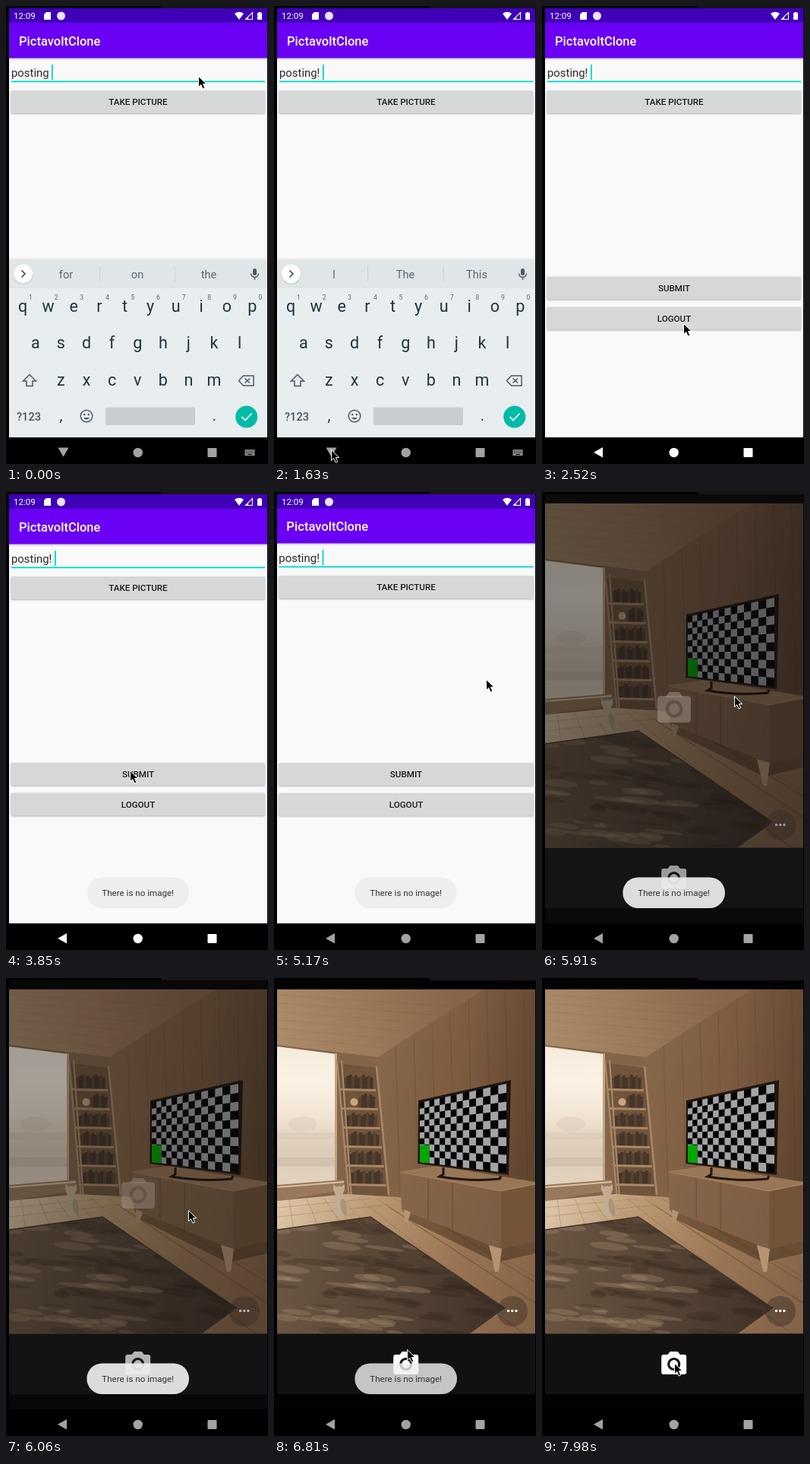
Animation of 345x602 px, one loop 8000 ms. Source, as an HTML page with a canvas:

```html
<!DOCTYPE html>
<html lang="en">
<head>
<meta charset="utf-8">
<title>Posting a photo</title>
<style>
  html, body { margin: 0; width: 100%; height: 100%; overflow: hidden; background: #000; }
  canvas { display: block; }
</style>
</head>
<body>
<canvas id="stage" width="345" height="602"></canvas>
<script>
const ctx = document.getElementById('stage').getContext('2d');
const LOOP = 8000, STEP = 147.9;
const TEAL = '#00d9c5', KEY = '#20343b', SOFT = '#5a6a72';

// Times in ms
const TYPED = 147, SPACED = 440, CLOSE_KEYS = 1700, SUBMIT = 3300, TOAST_IN = 3600,
      PICTURE = 4560, LEAVE = 4860, CAMERA = 5460, PREVIEW = 5750, BRIGHTEN = 5920, TOAST_OUT = 6600;

const POINTER = [
  [0, 253, 92], [300, 253, 92], [740, 296, 260], [1340, 180, 558], [1630, 75, 583],
  [1930, 75, 583], [2514, 186, 417], [2670, 186, 415], [3250, 164, 366], [3860, 163, 366],
  [4440, 268, 126], [4740, 268, 126], [5170, 279, 246], [5330, 279, 246], [5910, 253, 268],
  [6500, 175, 488], [7100, 175, 488], [7540, 174, 506], [8000, 174, 506]
];

const clamp = v => Math.max(0, Math.min(1, v));
const mix = (a, b, k) => a + (b - a) * k;
const ramp = (t, from, to) => clamp((t - from) / (to - from));
const ease = k => k * k * (3 - 2 * k);
const noise = n => { const v = Math.sin(n * 127.1) * 43758.5; return v - Math.floor(v); };

function rect(x, y, w, h, color) {
  ctx.fillStyle = color;
  ctx.fillRect(x, y, w, h);
}
function shape(path, fill, stroke, width = 1) {
  const p = new Path2D(path);
  if (fill) { ctx.fillStyle = fill; ctx.fill(p); }
  if (stroke) { ctx.strokeStyle = stroke; ctx.lineWidth = width; ctx.stroke(p); }
}
function circle(x, y, r, fill, stroke, width = 1) {
  ctx.beginPath();
  ctx.arc(x, y, r, 0, 7);
  if (fill) { ctx.fillStyle = fill; ctx.fill(); }
  if (stroke) { ctx.strokeStyle = stroke; ctx.lineWidth = width; ctx.stroke(); }
}
function ellipse(x, y, rx, ry, tilt, fill) {
  ctx.beginPath();
  ctx.ellipse(x, y, rx, ry, tilt, 0, 7);
  ctx.fillStyle = fill;
  ctx.fill();
}
function rounded(x, y, w, h, r, fill) {
  ctx.beginPath();
  ctx.roundRect(x, y, w, h, r);
  ctx.fillStyle = fill;
  ctx.fill();
}
function text(value, x, y, size, color, weight = 400, align = 'center') {
  ctx.font = `${weight} ${size}px Roboto, sans-serif`;
  ctx.textAlign = align;
  ctx.fillStyle = color;
  ctx.fillText(value, x, y);
}
function fade(x0, y0, x1, y1, ...colors) {
  const g = ctx.createLinearGradient(x0, y0, x1, y1);
  colors.forEach((c, i) => g.addColorStop(i / (colors.length - 1), c));
  return g;
}
function within(path, draw) {
  ctx.save();
  ctx.clip(new Path2D(path));
  draw();
  ctx.restore();
}
function at(x, y, scale, draw) {
  ctx.save();
  ctx.translate(x, y);
  ctx.scale(scale, scale);
  draw();
  ctx.restore();
}

function statusBar() {
  rect(4, 3, 340, 19.5, '#3f00b8');
  text('12:09', 10, 17, 11.6, '#fff', 400, 'left');
  shape('M53 8H59V18H50V11Z', '#fff');
  circle(72.5, 13, 5.5, '#e9e0fa');
  shape('M301 10Q307 5.5 313 10L307 18Z', '#fff');
  shape('M324.5 8.5V17.5H315.5Z', null, '#fff', 1.1);
  shape('M319 14.5V17.5H316Z', '#fff');
  shape('M331 9H332.5V8H335.5V9H337V18H331Z', '#fff');
}

function button(label, y, t, press, x) {
  ctx.save();
  ctx.shadowColor = 'rgba(0,0,0,.28)';
  ctx.shadowBlur = 2;
  ctx.shadowOffsetY = 1;
  rounded(6.5, y, 334.5, 30, 2, '#d6d7d7');
  ctx.restore();
  const age = t - press;
  if (age >= 0 && age < 450) within(`M6.5 ${y}h334.5v30h-334.5Z`, () =>
    circle(x, y + 15, mix(20, 340, ramp(age, 0, 250)), `rgba(0,0,0,${.12 * (1 - ramp(age, 150, 450))})`));
  text(label, 174, y + 19.2, 11.6, '#1c1c1c', 500);
}

function field(t) {
  const value = t < TYPED ? 'posting ' : t < SPACED ? 'posting!' : 'posting! ';
  text(value, 7, 93, 14.9, '#2a2a2a', 400, 'left');
  const caretX = 7 + ctx.measureText(value).width;
  const shown = t < SPACED || t > LEAVE || (t - SPACED) % 1000 < 500;
  if (shown) rect(Math.round(caretX), 77, 1.8, 20, TEAL);
  rect(7, 98.4, 334, 1.8, TEAL);
}

function app(t) {
  statusBar();
  within('M4 22H344V567H4Z', () => {
    const zoom = mix(1, 1.004, ramp(t, LEAVE, 5170));
    ctx.translate(174, 330);
    ctx.scale(zoom, zoom);
    ctx.translate(-174, -330);
    rect(0, 68, 345, 500, '#f9f9f9');
    rect(0, 68, 345, 4, fade(0, 68, 0, 72, 'rgba(0,0,0,.2)', 'rgba(0,0,0,0)'));
    rect(0, 20, 345, 48.5, '#6a00f4');
    text('PictavoltClone', 17, 52, 16.5, '#fff', 500, 'left');
    field(t);
    button('TAKE PICTURE', 111, t, PICTURE, 268);
    button('SUBMIT', 355.8, t, SUBMIT, 164);
    button('LOGOUT', 395.4, t, Infinity, 0);
    const slide = 236 * ease(ramp(t, CLOSE_KEYS, CLOSE_KEYS + 320));
    if (slide < 236) {
      ctx.translate(0, slide);
      keyboard(t);
    }
  });
}

function keyboard(t) {
  rect(4, 330, 340, 4, fade(0, 330, 0, 334, 'rgba(0,0,0,0)', 'rgba(0,0,0,.08)'));
  rect(4, 334, 340, 37, '#e0e5e8');
  rect(4, 371, 340, 197, '#e8edf0');

  circle(22.5, 353, 13, 'rgba(0,0,0,.1)');
  circle(22.5, 352, 12.5, '#fff');
  shape('M20.5 347.5L25 352L20.5 356.5', null, '#444f55', 1.7);
  const words = t < TYPED ? ['for', 'on', 'the'] : ['I', 'The', 'This'];
  words.forEach((w, i) => text(w, 79 + 94 * i, 357.5, 14.6, SOFT));
  rect(123, 342, 1, 20, '#cbd1d4');
  rect(222.5, 342, 1, 20, '#cbd1d4');
  rounded(325, 345, 5, 9, 2.5, '#4a5a62');
  shape('M322.5 351.5Q323 356.5 327.5 356.5T332.5 351.5M327.5 356.5V360', null, '#4a5a62', 1.4);

  [...'qwertyuiop'].forEach((c, i) => {
    text(c, 22 + 33.6 * i, 401.5, 21.5, KEY);
    text((i + 1) % 10, 32.5 + 33.6 * i, 385.5, 8.6, SOFT);
  });
  [...'asdfghjkl'].forEach((c, i) => text(c, 38.8 + 33.6 * i, 449.5, 21.5, KEY));
  [...'zxcvbnm'].forEach((c, i) => text(c, 72.4 + 33.6 * i, 498.5, 21.5, KEY));

  shape('M31 484.5L22.5 493H27V499.5H35V493H39.5Z', null, '#4a5a62', 1.5);
  shape('M312.5 486H326V499H312.5L306.5 492.5ZM314.5 489.5L321 495.5M321 489.5L314.5 495.5', null, '#4a5a62', 1.5);
  text('?123', 30, 545, 14.6, '#43545c', 500);
  text(',', 72.5, 545, 20, KEY);
  circle(106, 539, 7.8, null, '#4a5a62', 1.5);
  circle(103.2, 537, 1.2, '#4a5a62');
  circle(108.8, 537, 1.2, '#4a5a62');
  shape('M102 541Q106 546 110 541Z', '#4a5a62');
  rounded(131, 527.5, 118, 23.5, 2, '#c8cdd0');
  text('.', 274.5, 545, 20, KEY);
  circle(316.7, 540, 14.5, '#00bba8');
  shape('M310.5 540L315 544.5L323.5 535.5', null, '#fff', 1.8);
}

function navBar(t) {
  const typing = t < CLOSE_KEYS + 150;
  const color = typing || t > LEAVE ? '#a3a3a3' : '#fff';
  rect(0, 567, 345, 35, '#000');
  shape(typing ? 'M68.5 580.5H82.5L75.5 592.5Z' : 'M80 580V593.5L68 586.7Z', color);
  circle(173.7, 587, 6.2, color);
  rounded(265.5, 581, 12, 12, 1, color);
  if (!typing) return;
  rect(314.5, 583, 13, 8, '#8c8c8c');
  for (let i = 0; i < 10; i++) rect(316 + i % 5 * 2.2, 584.5 + (i / 5 | 0) * 2.2, 1, 1, '#000');
  rect(318, 589, 6, 1, '#000');
}

function toast(t) {
  const alpha = ramp(t, TOAST_IN, 3840) * (1 - ramp(t, TOAST_OUT, 7230) ** 1.9);
  if (!alpha) return;
  ctx.globalAlpha = alpha;
  rounded(106.4, 506.4, 134.6, 40.6, 20.3, 'rgba(238,238,238,.92)');
  ctx.globalAlpha = 1 - (1 - alpha) ** 2;
  text('There is no image!', 173.7, 531, 11.6, '#333');
  ctx.globalAlpha = 1;
}

function cameraIcon(x, y, scale, color, hole) {
  at(x, y, scale, () => {
    rounded(-16.5, -11, 33, 26, 3, color);
    shape('M-9 -10L-5 -15H5L9 -10Z', color);
    circle(0, 1.5, 7, null, hole, 3.2);
  });
}

function shelf() {
  const wood = '#a98866';
  shape('M85 112L135 118L150 286L100 290Z', '#70543b');
  for (let i = 0; i < 6; i++) {
    const y = 121 + 25 * i, left = 87 + i * 1.9, right = 134 + i * 2.7;
    const first = i === 1 ? 5 : 0;
    for (let b = first; b < 11; b++) {
      const tall = 15 + (b * 7 + i * 5) % 5;
      rect(mix(left + 5, right - 4, b / 11), y + 25 - tall, 3.9, tall, (b + i) % 3 ? '#46352a' : '#59432f');
    }
    shape(`M${left} ${y + 24}L${right} ${y + 25}V${y + 28}L${left} ${y + 27}Z`, wood);
  }
  circle(105.5, 163, 5, '#c8a683');
  shape('M83 108L99 290M89 108L102 290', null, wood, 2.2);
  shape('M135 116L151 285', null, wood, 2.6);
}

function television() {
  shape('M190 161L312 134L309 259L189.5 244Z', '#21160f');
  const cols = 14, rows = 10, depth = .74;
  const point = (c, r) => {
    const s = c / cols, k = s * depth / (1 - s + s * depth);
    return [mix(192, 306, k), mix(mix(164, 139, k), mix(242, 256, k), r / rows)];
  };
  const patch = (c, r, w, h, color) => {
    const corners = [point(c, r), point(c + w, r), point(c + w, r + h), point(c, r + h)];
    shape('M' + corners.map(p => p.join(' ')).join('L') + 'Z', color);
  };
  patch(0, 0, cols, rows, '#050505');
  for (let c = 0; c < cols; c++)
    for (let r = (c + 1) % 2; r < rows; r += 2) patch(c, r, 1, 1, '#a2a3a5');
  patch(0, 7.1, 2, 2.9, '#00a800');
  shape('M223 249V258L218 261Q260 268 297 264L299 260', null, '#20150e', 3);
}

function rug() {
  const outline = 'M4 331L127 314L304 434L257 468H4Z';
  shape(outline, fade(4, 400, 290, 420, '#6b5643', '#584536', '#42332a'));
  within(outline, () => {
    for (let i = 0; i < 110; i++) {
      const x = noise(i) * 300, y = 318 + noise(i + 200) * 150;
      const sunny = Math.sin((y - x * .1) / 8.5) > .1 && x < 210;
      ellipse(x, y, 9 + noise(i + 400) * 20, 2 + noise(i + 600) * 3, .12,
        sunny ? 'rgba(172,145,115,.3)' : 'rgba(50,36,27,.25)');
    }
  });
  shape('M4 331L127 314L304 434', null, '#43342a', 1.5);
}

function photo() {
  // Ceiling and walls
  rect(4, 15, 340, 453, '#947252');
  shape('M4 15H275L137 104L4 88Z', fade(4, 80, 240, 20, '#aa8b6a', '#9b795a', '#866549'));
  for (let i = 1; i < 7; i++)
    shape(`M4 ${88 - i * 11}L${137 + i * 17} ${104 - i * 11}`, null, 'rgba(80,50,25,.1)');
  shape('M4 88L137 104L152 290H4Z', '#84654a');
  shape('M137 104L275 15H344V300L152 290Z', fade(137, 150, 344, 190, '#876749', '#7c5b40', '#604530'));
  for (let x = 160; x < 344; x += 24)
    shape(`M${x} ${104 - (x - 137) * .645}L${x + 6} 280`, null, 'rgba(60,35,15,.18)');
  // Window
  shape('M4 90L82 100V268L4 274Z', fade(0, 90, 0, 272, '#f5ebdd', '#fbf1e4', '#f1e4d3', '#dccbb8', '#e2d2be'));
  ellipse(38, 192, 19, 10, 0, 'rgba(215,198,180,.4)');
  rect(4, 203, 77, 9, 'rgba(205,187,168,.3)');
  rect(4, 236, 77, 12, 'rgba(190,172,155,.35)');
  rect(80, 99, 3, 170, '#c0a483');
  shape('M4 272L92 265V279L4 293Z', '#98795b');
  shape('M4 275L92 268', null, '#d8c1a3', 2);
  shelf();
  // Floor
  shape('M4 293L96 284L165 288L344 365V468H4Z', fade(10, 300, 330, 450, '#dcc5a6', '#b8956f', '#997553', '#856347'));
  shape('M4 302L128 290M4 314L150 298', null, 'rgba(110,80,50,.25)');
  for (let i = 0; i < 7; i++)
    shape(`M${20 + i * 23} 290L${i * 65 + 40} 440`, null, 'rgba(85,55,30,.22)');
  shape('M150 300L344 428M180 300L344 400M120 315L330 468', null, 'rgba(75,45,25,.3)', 1.2);
  shape('M168 304L298 356L344 345V362L292 374L178 318Z', 'rgba(65,42,25,.5)');
  rug();
  // Cabinet
  shape('M166 254L215 247L344 268V272L299 281Z', '#997656');
  shape('M166 255L299 280V357L168 304Z', fade(166, 280, 300, 320, '#86664a', '#7d5e44'));
  shape('M299 280L344 271V345L299 357Z', '#735439');
  shape('M203 263V318M235 269V331', null, 'rgba(55,35,20,.4)');
  shape('M166 255L299 280L344 271', null, '#a98663', 1.2);
  shape('M171 304L180 308L176 321H172ZM283 351L300 356L296 386H291Z', '#b59370');
  television();
  // Cat
  const fur = '#c2ab90';
  shape('M78 279L78 271L83 275H88L93 271L93 280Z', fur);
  circle(85.5, 280, 6.5, fur);
  ellipse(86, 290, 6, 10, 0, fur);
  ellipse(88, 303, 9.5, 11, 0, fur);
  shape('M93 312Q105 313 109 307', null, '#b49b7e', 2.5);
  ellipse(92, 301, 4, 11, -.2, 'rgba(100,75,50,.25)');
}

function camera(t) {
  const wake = ease(ramp(t, BRIGHTEN, 6360));
  const grey = (from, to) => {
    const v = Math.round(mix(from, to, wake));
    return `rgb(${v},${v},${v})`;
  };
  rect(4, 3, 340, 564, grey(10, 2));
  rect(4, 15, 340, 453, '#161616');
  if (t >= PREVIEW) within('M4 15H344V467.5H4Z', () => {
    photo();
    rect(4, 15, 340, 453, `rgba(14,14,16,${.48 * (1 - wake)})`);
  });
  rect(4, 467.5, 340, 79.5, grey(20, 17));
  if (wake < 1) {
    ctx.globalAlpha = .45 * (1 - wake);
    cameraIcon(174, 283, 1.33, '#b0a49a', '#3d342d');
    ctx.globalAlpha = 1;
  }
  circle(314, 438, 20, 'rgba(50,42,36,.4)');
  const color = grey(155, 255);
  [308.5, 313.7, 318.9].forEach(x => circle(x, 437.5, 1.7, color));
  cameraIcon(173.7, 506, 1, color, '#131313');
}

function pointer(t) {
  const next = Math.max(1, POINTER.findIndex(p => p[0] > t));
  const [t0, x0, y0] = POINTER[next - 1], [t1, x1, y1] = POINTER[next];
  const k = ease(ramp(t, t0, t1));
  at(mix(x0, x1, k), mix(y0, y1, k), 1, () =>
    shape('M.5 .5V14.5L3.7 11.5L6.2 17L8.8 15.8L6.4 10.5H10.8Z', '#000', '#fff', 1));
}

function draw(now) {
  const t = Math.floor((now % LOOP + 8) / STEP) * STEP;
  rect(0, 0, 345, 602, '#000');
  rect(205, 0, 140, 3, '#161616');
  if (t < CAMERA) app(t); else camera(t);
  navBar(t);
  toast(t);
  pointer(t);
}

const start = performance.now();
function tick() {
  draw(performance.now() - start);
  requestAnimationFrame(tick);
}
tick();
</script>
</body>
</html>
```
